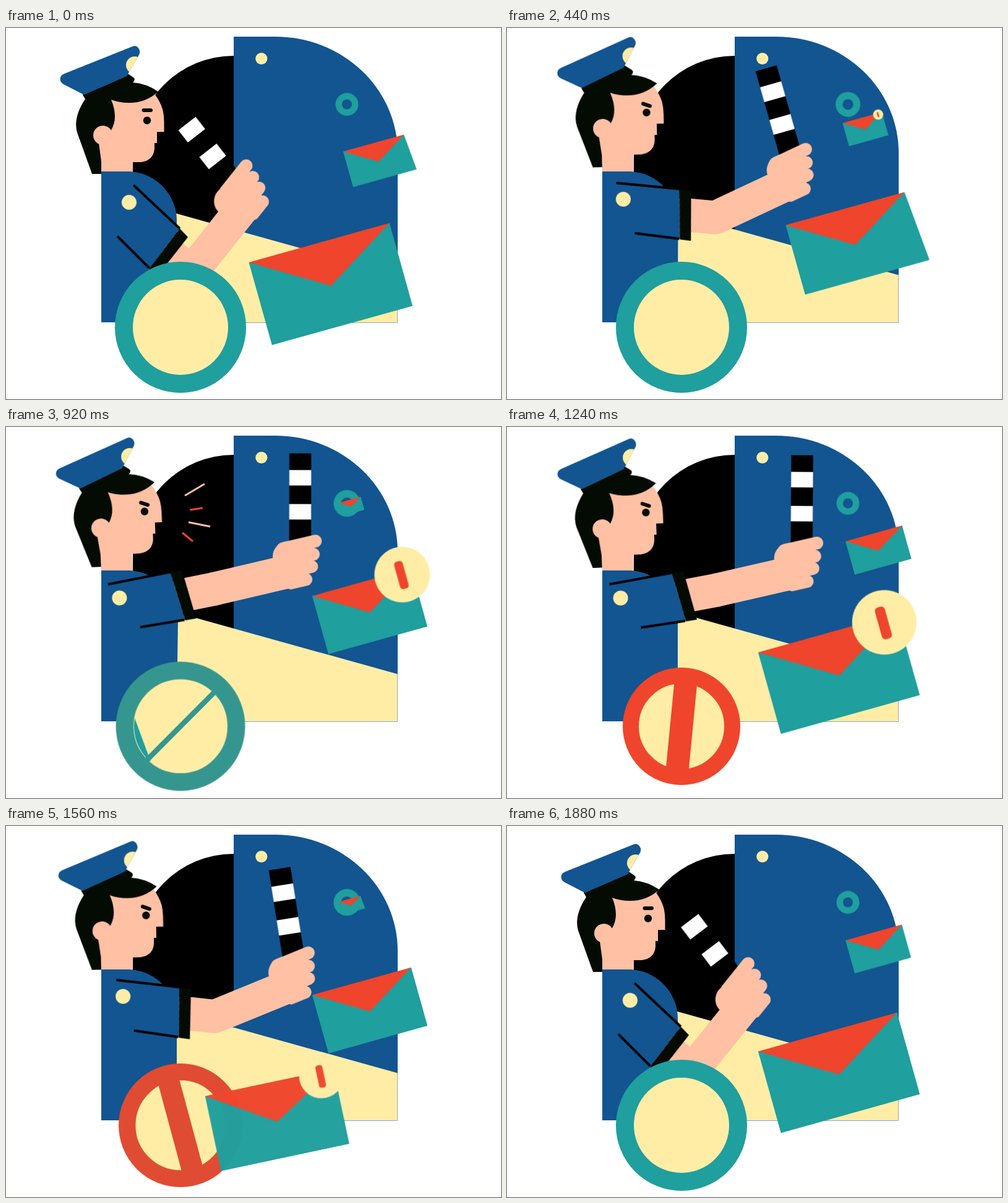
Recreate the animation shown at these times as an HTML page without scripts. Size 800 by 600 pixels, loop 1.92 s.

```html
<!DOCTYPE html>
<html lang="en">
<head>
<meta charset="utf-8">
<title>Mail guard</title>
<style>
html, body { margin: 0; width: 100%; height: 100%; overflow: hidden; background: #fff; }
svg { display: block; width: 100vw; height: 100vh; }
svg * { animation: 1920ms linear infinite; }

.blue { fill: #125591; }
.teal { fill: #1f9f9d; }
.red { fill: #ef452c; }
.cream { fill: #ffeda6; }
.skin { fill: #ffc0a4; }
.dark { fill: #040b03; }
.limb { stroke: #ffc0a4; stroke-width: 54; }
.fingers { stroke: #ffc0a4; stroke-width: 20.5; stroke-linecap: round; }
.seam { stroke: #000; stroke-width: 4; }

/* head */
.head { transform-origin: 61px 244px; animation-name: nod; }
@keyframes nod {
  0%, 97.9%, 100% { transform: translateY(0) rotate(0deg); animation-timing-function: ease-in-out; }
  12.5% { transform: translateY(0) rotate(2.4deg); animation-timing-function: ease-in-out; }
  28.1% { transform: translateY(-11px) rotate(-2.6deg); }
  33.3%, 47.9% { transform: translateY(-6px) rotate(-2.4deg); }
  64.6% { transform: translateY(-5.2px) rotate(-2.1deg); }
  81.25% { transform: translateY(-2px) rotate(-1deg); }
}
.cap { transform-origin: 74px 206px; animation-name: tip; }
@keyframes tip {
  0%, 18% { transform: rotate(0deg); animation-timing-function: ease-in; }
  28.1% { transform: rotate(-3.2deg); }
  33.3% { transform: rotate(-2.5deg); animation-timing-function: ease-out; }
  45%, 100% { transform: rotate(0deg); }
}
.brow { transform-origin: 228px 133px; animation-name: frown; }
@keyframes frown {
  0%, 4%, 97%, 100% { transform: translateY(0) rotate(0deg); }
  12.5%, 84% { transform: translateY(4px) rotate(20deg); }
}
.face { animation-name: sneer; }
@keyframes sneer {
  0%, 6%, 21%, 100% { d: path("M150 186L148 150L165 100L241 108C247 116 251 124 253.5 133Q255.5 142 255.5 152L255.5 168L244 168L244 186L240 186L240 193C240 208 230 217 215 217L205 217L205 262L154 262L154 232Z"); }
  12.5% { d: path("M150 186L148 150L165 100L241 108C247 116 251 124 253.5 133Q246 141 238 148L255.5 168L244 168L244 186L240 186L240 193C240 208 230 217 215 217L205 217L205 262L154 262L154 232Z"); }
}

.torso { animation-name: puffup; }
@keyframes puffup {
  0%, 22%, 58%, 100% { d: path("M154 232L196 232C240 232 276 268 276 312L276 446L276 476L154 476Z"); }
  33.3% { d: path("M154 232L196 232C240 232 282 268 282 312L276 446L276 476L154 476Z"); }
  47.9% { d: path("M154 232L196 232C240 232 278 268 278 312L276 446L276 476L154 476Z"); }
}

/* arm */
.arm { animation-name: swing; }
@keyframes swing {
  0%, 97.9%, 100% { transform: translate(193px, 295.5px) rotate(43deg); animation-timing-function: ease-in-out; }
  12.5% { transform: translate(193px, 296.5px) rotate(45.9deg); animation-timing-function: ease-in-out; }
  29.2%, 60% { transform: translate(191px, 289.2px) rotate(-11.4deg); animation-timing-function: linear; }
  64.6% { transform: translate(191px, 289.5px) rotate(-10.6deg); animation-timing-function: ease-in; }
  81.25% { transform: translate(192.5px, 290px) rotate(6.1deg); animation-timing-function: ease-out; }
}
.fore { animation-name: bend; }
@keyframes bend {
  0%, 100% { transform: translate(146px, 2px) rotate(-94.5deg); animation-timing-function: ease-in-out; }
  12.5% { transform: translate(146px, 2px) rotate(-100.3deg); animation-timing-function: ease-in-out; }
  29.2%, 60% { transform: translate(146px, 2px) rotate(-1.8deg); animation-timing-function: linear; }
  64.6% { transform: translate(146px, 2px) rotate(-2.3deg); animation-timing-function: ease-in; }
  81.25% { transform: translate(146px, 2px) rotate(-28.2deg); animation-timing-function: ease-out; }
  97.9% { transform: translate(146px, 2px) rotate(-94.2deg); }
}
.fingers { animation-name: grip; }
@keyframes grip {
  0%, 100% { transform: translateX(13px); }
  12.5%, 83% { transform: translateX(0); }
  97.9% { transform: translateX(14px); }
}
.baton { animation-name: wobble; }
@keyframes wobble {
  0%, 100% { transform: translate(155.2px, -27.9px) rotate(13.5deg); }
  12.5%, 42%, 83% { transform: translate(151.2px, -27.9px) rotate(13.3deg); animation-timing-function: ease-in-out; }
  22% { transform: translate(151.2px, -27.9px) rotate(9deg); animation-timing-function: ease-in-out; }
  30% { transform: translate(151.2px, -27.9px) rotate(20.5deg); }
  33.3% { transform: translate(151.2px, -27.9px) rotate(19.2deg); animation-timing-function: ease-in-out; }
  97.9% { transform: translate(156.2px, -27.9px) rotate(14deg); }
}
.sparks { stroke-width: 3; animation-name: shout; animation-timing-function: step-end; }
@keyframes shout {
  0%, 56.2%, 100% { opacity: 0; }
  29.1% { opacity: 1; }
}

/* lens */
.lens { animation-name: pulse; }
@keyframes pulse {
  0%, 6.25%, 20.8%, 44.8%, 91.7%, 100% { transform: translate(282px, 484px) scale(1); }
  12.5% { transform: translate(282px, 484px) scale(.962); }
  47.9% { transform: translate(282px, 484px) scale(.986); }
  60.4% { transform: translate(282px, 484px) scale(.9); }
  64.6%, 72% { transform: translate(282px, 484px) scale(.896); }
  81.25% { transform: translate(282px, 484px) scale(.943); }
}
.rim { fill: none; stroke: #1f9f9d; stroke-width: 29; animation-name: warn; }
.bar { fill: #1f9f9d; animation-name: warn, slash; }
@keyframes warn {
  0%, 46%, 93.75%, 100% { stroke: #1f9f9d; fill: #1f9f9d; }
  47.9% { stroke: #349690; fill: #349690; }
  60%, 79% { stroke: #ef452c; fill: #ef452c; }
  81.25% { stroke: #e04c33; fill: #e04c33; }
}
.bar { stroke-width: 0; }
.rim { fill-opacity: 0; }
@keyframes slash {
  0%, 45.8% { transform: rotate(50deg) scaleX(0); }
  47.9% { transform: rotate(45deg) scaleX(.21); }
  64.6% { transform: rotate(5.6deg) scaleX(1.03); }
  81.25% { transform: rotate(-15deg) scaleX(.93); }
  91.7%, 100% { transform: rotate(-30deg) scaleX(0); }
}

/* letters */
.port { animation-name: puff; animation-duration: 640ms; }
@keyframes puff {
  0%, 18%, 94%, 100% { transform: translate(551px, 123.5px) scale(1); }
  37.5% { transform: translate(551px, 123.5px) scale(1.2); }
  43.75% { transform: translate(551px, 123.5px) scale(1.17); }
}
.mail { animation-name: fly; }
.mail.one { animation-delay: -1280ms; }
.mail.two { animation-delay: -640ms; }
.mail.bad { animation-name: bounce; }
@keyframes fly {
  0%, 10.4% { opacity: 0; transform: translate(553px, 124px) rotate(-15.6deg) scale(.095); }
  12.5% { opacity: .8; transform: translate(555px, 126px) rotate(-15.6deg) scale(.125); }
  14.583% { opacity: 1; transform: translate(558px, 128px) rotate(-15.6deg) scale(.157); }
  31.25% { transform: translate(600px, 198.5px) rotate(-15.6deg) scale(.407); }
  33.333% { transform: translate(602px, 214.5px) rotate(-15.6deg) scale(.438); }
  45.833% { transform: translate(594px, 278px) rotate(-15.6deg) scale(.67); }
  47.917% { transform: translate(588px, 297.5px) rotate(-15.6deg) scale(.714); }
  64.583% { transform: translate(536.5px, 398.5px) rotate(-15.6deg) scale(1.002); }
  66.667% { transform: translate(525px, 413.5px) rotate(-15.6deg) scale(1.016); }
  68.75% { transform: translate(508px, 427px) rotate(-15.6deg) scale(1.02); }
  70.833% { transform: translate(474px, 444px) rotate(-15.6deg) scale(1.01); }
  72.917% { transform: translate(418px, 464px) rotate(-15.6deg) scale(.975); }
  75% { transform: translate(340px, 487px) rotate(-15.6deg) scale(.927); }
  79.167% { transform: translate(172px, 527px) rotate(-15.6deg) scale(.819); }
  81.25% { transform: translate(136px, 541px) rotate(-15.6deg) scale(.767); }
  86% { opacity: 1; transform: translate(50px, 560px) rotate(-15.6deg) scale(.7); }
  86.01%, 100% { opacity: 0; transform: translate(553px, 124px) rotate(-15.6deg) scale(.095); }
}
@keyframes bounce {
  0%, 10.4% { opacity: 0; transform: translate(553px, 124px) rotate(-15.6deg) scale(.095); }
  12.5% { opacity: .8; transform: translate(555px, 126px) rotate(-15.6deg) scale(.125); }
  14.583% { opacity: 1; transform: translate(558px, 128px) rotate(-15.6deg) scale(.157); }
  31.25% { transform: translate(600px, 198.5px) rotate(-15.6deg) scale(.407); }
  33.333% { transform: translate(602px, 214.5px) rotate(-15.6deg) scale(.438); }
  45.833% { transform: translate(594px, 278px) rotate(-15.6deg) scale(.67); }
  47.917% { transform: translate(588px, 297.5px) rotate(-15.6deg) scale(.714); }
  64.583% { transform: translate(536.5px, 398.5px) rotate(-15.6deg) scale(1.002); }
  66.667% { transform: translate(525px, 413.5px) rotate(-15.6deg) scale(1.016); }
  70.833% { transform: translate(474px, 444px) rotate(-15.6deg) scale(1); }
  72.917% { transform: translate(425px, 464px) rotate(-15deg) scale(.96); }
  75% { transform: translate(405px, 470px) rotate(-13deg) scale(.93); }
  80.8% { opacity: 1; }
  81.25% { opacity: .985; transform: translate(438px, 475.5px) rotate(-12deg) scale(.912); }
  89.6%, 100% { opacity: 0; transform: translate(455px, 480px) rotate(-10deg) scale(.86); }
}
.sheet { animation-name: flare; animation-timing-function: step-end; }
@keyframes flare {
  0% { d: path("M-116 -68L116 -68L127 68L-116 68Z"); }
  90%, 100% { d: path("M-116 -68L116 -68L116 68L-116 68Z"); }
}
.alert { animation-name: pop; }
@keyframes pop {
  0%, 21% { transform: translate(93px, -60px) scale(0); animation-timing-function: ease-out; }
  28.1% { transform: translate(93px, -60px) scale(1.35); }
  33.3% { transform: translate(93px, -60px) scale(1.317); }
  47.9% { transform: translate(93px, -60px) scale(1.21); }
  64.6% { transform: translate(93px, -60px) scale(1); }
  81.25% { transform: translate(93px, -60px) scale(.76); }
  91%, 100% { transform: translate(93px, -60px) scale(.6); }
}
</style>
</head>
<body>
<svg viewBox="0 0 800 600">
  <defs>
    <path id="hat" d="M126 108L93 91Q86 87 88 80Q89 76 94 74L204 30Q211 27 215 34Q218 39 214 45L195 78Z"/>
    <clipPath id="hatClip"><use href="#hat"/></clipPath>
    <clipPath id="lensClip">
      <circle cx="282" cy="484" r="75"/>
      <rect x="282" width="518" height="600"/>
    </clipPath>
    <polygon id="flap" class="red" points="-116,-68 116,-68 0,3"/>
  </defs>

  <!-- mailbox -->
  <path d="M368 45A159 159 0 0 0 209 204L205 204V340H368Z"/>
  <path class="blue" d="M368 14H435A198 188 0 0 1 633 202V476.5H368Z"/>
  <path class="cream" d="M270 298.5L632.6 399.6V476H270Z"/>
  <circle class="cream" cx="412.8" cy="49.5" r="9.6"/>
  <g class="port">
    <circle class="teal" r="18.5"/>
    <circle class="blue" r="8"/>
  </g>

  <g class="sparks">
    <path stroke="#ffc0a4" d="M289 111L321 92M295 154L330 161"/>
    <path stroke="#ef452c" d="M297 134L318 131M285 171L302 185"/>
  </g>

  <g class="head">
    <path class="skin face" d="M150 186L148 150L165 100L241 108C247 116 251 124 253.5 133Q255.5 142 255.5 152L255.5 168L244 168L244 186L240 186L240 193C240 208 230 217 215 217L205 217L205 262L154 262L154 232Z"/>
    <path class="dark" d="M139 236L115 169Q108 145 128 115L124 108L127 100L194 72L206 80Q209 82 207 86L205 88Q228 90 246 103Q226 121 199 121Q183 121 170 116Q182 145 170 165L150 186L154 216V236Z"/>
    <circle class="skin" cx="156.5" cy="173.5" r="15.5"/>
    <circle class="dark" cx="228" cy="149.5" r="6.2"/>
    <rect class="dark brow" x="219.5" y="130" width="17.5" height="6" rx="3"/>
    <g class="cap">
      <use href="#hat" class="blue"/>
      <g clip-path="url(#hatClip)"><circle class="cream" cx="208" cy="60" r="14"/></g>
    </g>
  </g>

  <path class="blue torso" d="M154 232L196 232C240 232 276 268 276 312L276 446L276 476L154 476Z"/>

  <g class="arm">
    <g class="fore">
      <g class="baton">
        <rect x="-17.7" y="-158" width="35.4" height="165"/>
        <path fill="#fff" d="M-17.7 -131h35.4v25h-35.4zM-17.7 -76h35.4v25h-35.4z"/>
      </g>
      <path class="limb" d="M0 0H145"/>
      <circle class="skin" cx="129.6" cy="-24" r="24.2"/>
      <path class="fingers" d="M125 -37.9H179M125 -18.1H171M125 .7H163.7M125 19.1H150"/>
    </g>
    <path class="limb" stroke-linecap="round" d="M95 2H146"/>
    <path class="blue" d="M-18 -38L84 -38L92 41.5L18 39Z"/>
    <path class="seam" d="M-18.6 -39.2L84 -38.8M18.6 39L91 41.5"/>
    <path class="dark" d="M84 -38.8L103 -37.8L110 43L92 42.5Z"/>
    <circle class="cream" cx="-4.9" cy="-13.9" r="12"/>
  </g>

  <g class="lens">
    <circle class="cream" r="80"/>
    <rect class="bar" x="-20" y="-84" width="40" height="168"/>
    <circle class="rim" r="91.5"/>
  </g>

  <g clip-path="url(#lensClip)">
    <g class="mail one">
      <rect class="teal" x="-116" y="-68" width="232" height="136"/>
      <use href="#flap"/>
    </g>
  </g>
  <g clip-path="url(#lensClip)">
    <g class="mail two">
      <path class="teal sheet" d="M-116 -68L116 -68L127 68L-116 68Z"/>
      <use href="#flap"/>
    </g>
  </g>
  <g class="mail bad">
    <rect class="teal" x="-116" y="-68" width="232" height="136"/>
    <use href="#flap"/>
    <g class="alert">
      <circle class="cream" r="52"/>
      <rect class="red" x="-10" y="-26" width="16.5" height="53" rx="6"/>
    </g>
  </g>
</svg>
</body>
</html>
```
